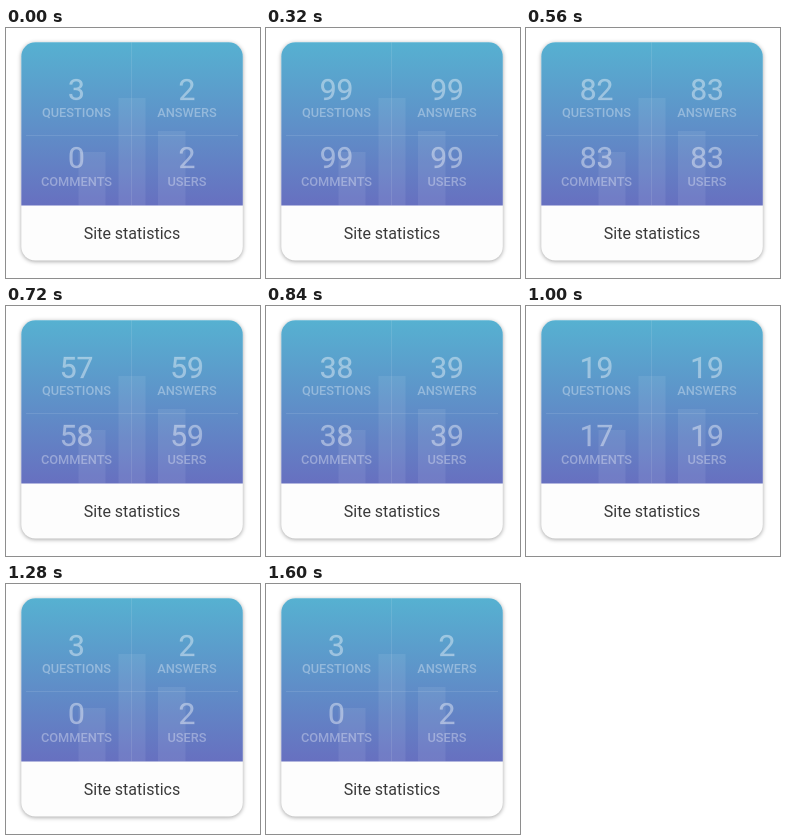
Recreate the animation shown at these times as an HTML page. Size 254 by 250 pixels, loop 2280 ms.

```html
<!DOCTYPE html>
<html lang="en">
<head>
<meta charset="utf-8">
<title>Site statistics</title>
<style>
  html, body { margin: 0; width: 100%; height: 100%; overflow: hidden; background: #fff; }
  svg { display: block; width: 254px; height: 250px; font-family: Roboto, Arial, sans-serif; text-anchor: middle; }
  .card { fill: #fdfdfd; filter: drop-shadow(0 1px 2px rgba(0, 0, 0, .36)); }
  .bars { fill: #fff; fill-opacity: .075; }
  .grid { stroke: #fff; stroke-opacity: .1; }
  .stats { fill: #fff; }
  .num { font-size: 30px; fill-opacity: .4; stroke: #fff; stroke-opacity: .12; stroke-width: .8px; }
  .label { font-size: 12.8px; font-weight: 500; fill-opacity: .34; }
  .title { font-size: 16px; fill: #3a3a3a; }
</style>
</head>
<body>
<svg viewBox="0 0 254 250">
  <defs>
    <linearGradient id="sky" x1="0" y1="0" x2="0" y2="1">
      <stop offset="0" stop-color="#56b1d1"/>
      <stop offset="1" stop-color="#6770c0"/>
    </linearGradient>
    <clipPath id="round"><rect x="15.300" y="14.300" width="221.500" height="218.200" rx="14"/></clipPath>
  </defs>
  <rect class="card" x="15.300" y="14.300" width="221.500" height="218.200" rx="14"/>
  <g clip-path="url(#round)">
    <rect x="15" y="14" width="223" height="163.500" fill="url(#sky)"/>
    <path class="bars" d="M72.500 124h27v53.500h-27z M112.500 70h27v107.500h-27z M152 103h27.500v74.500h-27.500z"/>
    <path class="grid" d="M125.500 14V177.500 M20 107.500H232"/>
  </g>
  <g class="stats">
    <text class="num" x="70.500" y="71.500"></text><text class="label" x="70.500" y="89.300">QUESTIONS</text>
    <text class="num" x="181" y="71.500"></text><text class="label" x="181" y="89.300">ANSWERS</text>
    <text class="num" x="70.500" y="140.200"></text><text class="label" x="70.500" y="158.200">COMMENTS</text>
    <text class="num" x="181" y="140.200"></text><text class="label" x="181" y="158.200">USERS</text>
  </g>
  <text class="title" x="126" y="210.700">Site statistics</text>
</svg>
<script>
  const LOOP = 2280, STEP = 40;
  const times = [0, 240, 320, 560, 840, 1000, 1120, 1320, LOOP];
  const counts = [
    [3, 99, 99, 82, 38, 19, 6, 3, 3],
    [2, 99, 99, 83, 39, 19, 6, 2, 2],
    [0, 99, 99, 83, 38, 17, 4, 0, 0],
    [2, 99, 99, 83, 39, 19, 6, 2, 2]
  ];
  const nums = document.querySelectorAll('.num');

  // Flat at the ends and plateaus, central difference on the way down.
  function slope(v, i) {
    if (i < 3 || i > 6) return 0;
    return (v[i + 1] - v[i - 1]) / (times[i + 1] - times[i - 1]);
  }

  // Cubic Hermite curve through the count points.
  function valueAt(v, t) {
    const i = times.findIndex(x => x > t) - 1;
    const span = times[i + 1] - times[i];
    const p = (t - times[i]) / span, q = 1 - p;
    return v[i] * q * q * (1 + 2 * p) + v[i + 1] * p * p * (3 - 2 * p)
      + span * p * q * (slope(v, i) * q - slope(v, i + 1) * p);
  }

  function draw(now) {
    const t = Math.floor((now % LOOP) / STEP) * STEP;
    nums.forEach((el, i) => {
      const n = Math.round(valueAt(counts[i], t));
      el.textContent = Math.max(counts[i][0], Math.min(99, n));
    });
  }

  const start = performance.now();
  function tick() {
    draw(performance.now() - start);
    requestAnimationFrame(tick);
  }
  tick();
</script>
</body>
</html>
```
